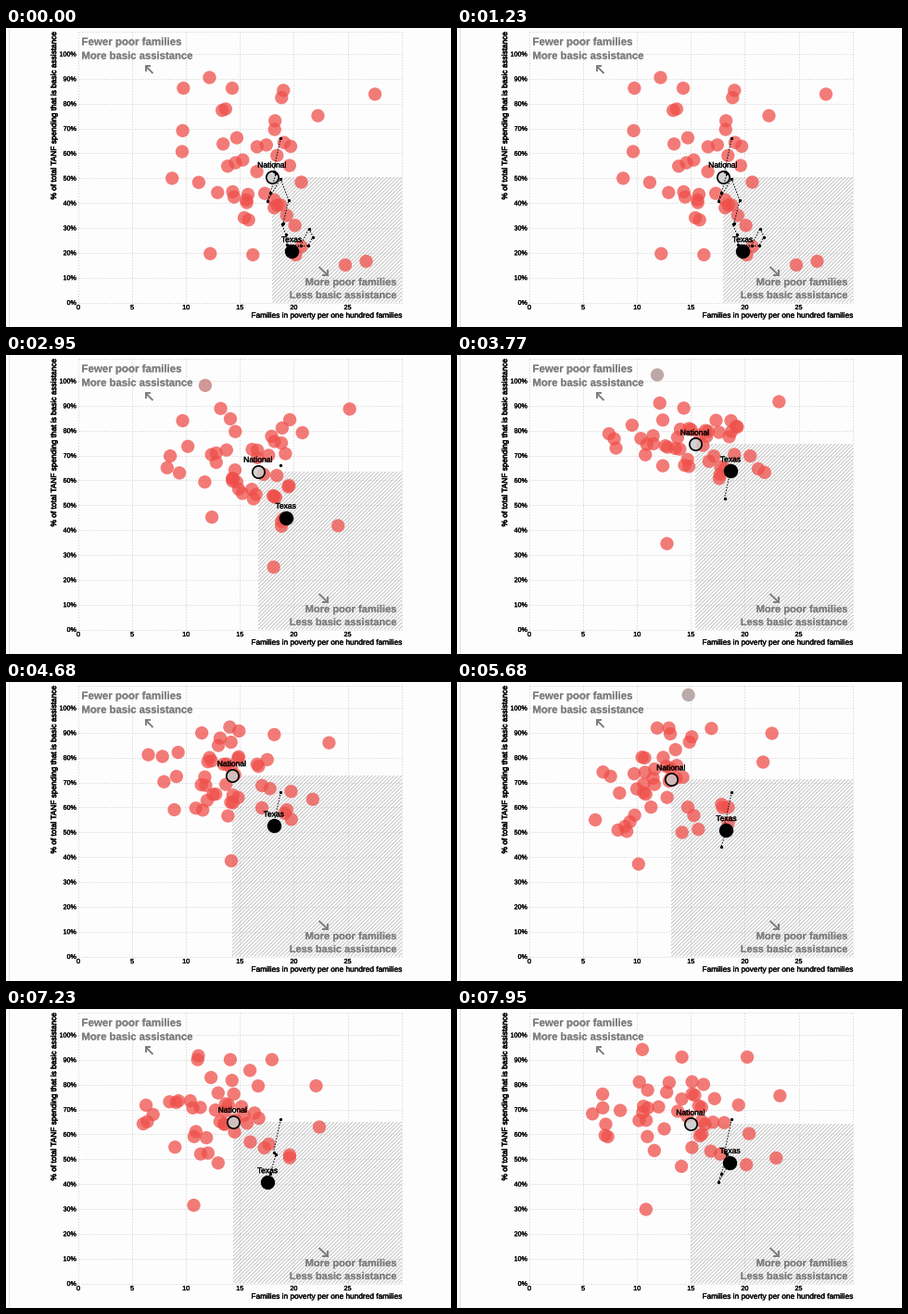
Recreate the animation shown at these times as a matplotlib script. Size 480 by 323 pixels, loop 8000 ms.

```python
import numpy as np
import matplotlib.pyplot as plt
from matplotlib.animation import FuncAnimation
from matplotlib.collections import LineCollection
from matplotlib.patches import Rectangle
from matplotlib.patheffects import withStroke

W, H, DPI = 480, 323, 100
PT = 72 / DPI
LEFT, TOP, RIGHT, BASE = 78, 4, 426.5, 296.5
STEP, LOOP = 40, 8000
FIRST, PERIOD, MOVE = 2510, 970, 800
FULL_Y = 28.5                      # height of the 100% line
STATES = 49

plt.rcParams["font.family"] = "Liberation Sans"

# Yearly stops of the highlighted state, in stage pixels.
TRAIL = np.array([(296.3, 119), (288.5, 155), (291.3, 157), (285, 178), (282, 187),
                  (296, 163), (305, 186), (299, 210.5), (297.5, 212), (302, 223),
                  (303, 234), (317.5, 235), (327, 216.5), (331, 225.5),
                  (326, 235), (308, 237), (308, 241)])


def year(average, centre, spread, *edge):
    """Average, middle and spread of the cloud, and its outermost states."""
    return np.array([average, centre, spread, *edge], float)


# Edge states: top, upper right, right, left, bottom.
LATEST = year((287, 160.5), (262, 155), (46, 50),
              (219.5, 53.5), (398, 71.5), (388.5, 252), (190, 133.5), (366, 256))
Y1 = year((259, 95.4), (252, 93), (46, 23),
          (211, 15), (347, 47), (332, 126), (166, 88), (222, 206))
Y2 = year((245, 100.6), (238, 102), (44, 27),
          (240, 53), (349, 67), (331, 131), (154, 71), (248, 193))
Y3 = year((230.2, 103), (220, 106), (40, 32),
          (255, 7), (343, 53), (330, 86), (149, 151), (195, 195))
Y4 = year((236, 118.6), (220, 110), (42, 29),
          (216, 58), (319, 71), (331, 90), (150, 136), (201, 207))
Y6 = year((253, 124.7), (237, 111), (44, 33),
          (199, 43), (350, 95), (345, 165), (146, 112), (204, 217))
PLAN = [LATEST, Y1, Y2, Y3, Y4, (Y4 + Y6) / 2, Y6]


def build_years():
    """Every state drifts slowly within the cloud; rows end with state and average."""
    rng = np.random.default_rng(12)
    keep = 0.8
    z = rng.normal(size=(STATES - 5, 2))
    years = []
    for k, plan in enumerate(PLAN):
        average, centre, spread, edge = plan[0], plan[1], plan[2], plan[3:]
        cloud = centre + spread * np.clip(z, -1.8, 1.8)
        years.append(np.vstack([cloud, edge, TRAIL[k - 1], average]))
        z = keep * z + np.sqrt(1 - keep ** 2) * rng.normal(size=z.shape)
    return years


def ease(u):
    u = min(max(u, 0), 1)
    return 4 * u ** 3 if u < 0.5 else 1 - 4 * (1 - u) ** 3


YEARS = build_years()
RED = np.array([0.937, 0.31, 0.29, 0.75])
GREY = np.array([0.6, 0.6, 0.6, 0.75])

fig = plt.figure(figsize=(W / DPI, H / DPI), dpi=DPI, facecolor="#fefdfe")
ax = fig.add_axes([0, 0, 1, 1])
ax.set(xlim=(0, W), ylim=(H, 0))
ax.axis("off")


def text(x, y, s, px, color="black", heavy=0.3, **kw):
    kw.setdefault("va", "baseline")
    return ax.text(x, y, s, fontsize=px * PT, color=color,
                   path_effects=[withStroke(linewidth=heavy * PT, foreground=color)], **kw)


def arrow(tail, tip):
    (x0, y0), (x1, y1) = tail, tip
    head = 5.5 if x1 > x0 else -5.5
    for xs, ys in (((x0, x1), (y0, y1)), ((x1 - head, x1, x1), (y1, y1, y1 - head))):
        ax.plot(xs, ys, color="#7c7c7c", lw=1.9 * PT, zorder=8,
                solid_capstyle="butt", solid_joinstyle="miter")


# Grid and axes
ax.plot([2.5, 2.5], [0, H], color="#e2e2e2", lw=PT, zorder=0)
grid = dict(color="#dcdcdc", lw=PT, ls=(0, (1.5, 1.5)), zorder=1)
for k in range(7):
    x = LEFT + 58.1 * k
    ax.plot([x, x], [TOP, BASE], **grid)
    if k < 6:
        text(x, 304, str(5 * k), 7.2, ha="center")
for k in range(11):
    y = BASE - 26.85 * k
    ax.plot([LEFT, RIGHT], [y, y], **grid)
    text(76, y + 2.5, f"{10 * k}%", 7.1, ha="right")
ax.plot([LEFT, RIGHT], [TOP, TOP], **grid)
text(427, 313, "Families in poverty per one hundred families", 8.3, ha="right")
text(52.6, 95, "% of total TANF spending that is basic assistance", 8.3,
     heavy=0.5, rotation=90, ha="center", va="center")

# Corner notes
note = dict(color="#7f7f7f", heavy=0.1, weight="bold", zorder=8)
text(81.5, 18.5, "Fewer poor families", 11.5, **note)
text(81.5, 33.5, "More basic assistance", 11.3, **note)
text(421.8, 278, "More poor families", 11.1, ha="right", **note)
text(421.8, 292, "Less basic assistance", 11, ha="right", **note)
arrow((158.5, 49), (150.5, 41))
arrow((337.5, 258), (346.5, 266.5))

# Moving parts
hatch = LineCollection([[(s - BASE, BASE), (s, 0)] for s in range(200, 740, 4)],
                       colors="#bababa", linewidths=0.8 * PT, zorder=2)
ax.add_collection(hatch)
dots = ax.scatter(*YEARS[0][:STATES].T, s=(14.3 * PT) ** 2, lw=0, zorder=3)
dots.set_clip_path(Rectangle((LEFT, TOP), RIGHT - LEFT, BASE - TOP, transform=ax.transData))
state_dot, = ax.plot([], [], "o", ms=15.4 * PT, color="black", mew=0, zorder=4)
mean_dot, = ax.plot([], [], "o", ms=13.3 * PT, mfc=(0.8, 0.8, 0.8, 0.85), mec="black",
                    mew=1.7 * PT, zorder=5)
path, = ax.plot([], [], color="black", lw=PT, ls=(0, (1.5, 1.5)), zorder=6)
stops, = ax.plot([], [], "o", color="black", ms=3.3 * PT, mew=0, zorder=6)
state_label = text(0, 0, "Texas", 8.5, ha="center", zorder=7)
mean_label = text(0, 0, "National", 8.5, ha="center", zorder=7)


def tint(pose):
    return (pose[:STATES, 1] < FULL_Y).astype(float)[:, None]


def draw(i):
    ms = i * STEP
    if ms < FIRST:
        a = b = YEARS[0]
        p, trail = 0, TRAIL
    else:
        k, since = divmod(ms - FIRST, PERIOD)
        a, b = YEARS[k], YEARS[k + 1]
        p, trail = ease(since / MOVE), TRAIL[:k + 1]
    pose = a + p * (b - a)
    grey = tint(a) + p * (tint(b) - tint(a))
    dots.set_offsets(pose[:STATES])
    dots.set_facecolor(RED + grey * (GREY - RED))
    for (x, y), dot, label in zip(pose[STATES:], (state_dot, mean_dot),
                                  (state_label, mean_label)):
        dot.set_data([x], [y])
        label.set_position((x, y - 9.8))
    path.set_data(trail.T)
    stops.set_data(trail.T)
    x, y = pose[-1]
    hatch.set_clip_path(Rectangle((x, y), RIGHT - x, BASE - y, transform=ax.transData))
    return dots, state_dot, mean_dot, path, stops, state_label, mean_label, hatch


anim = FuncAnimation(fig, draw, frames=LOOP // STEP, interval=STEP, repeat=True,
                     repeat_delay=0, init_func=lambda: draw(0))
plt.show()
```
